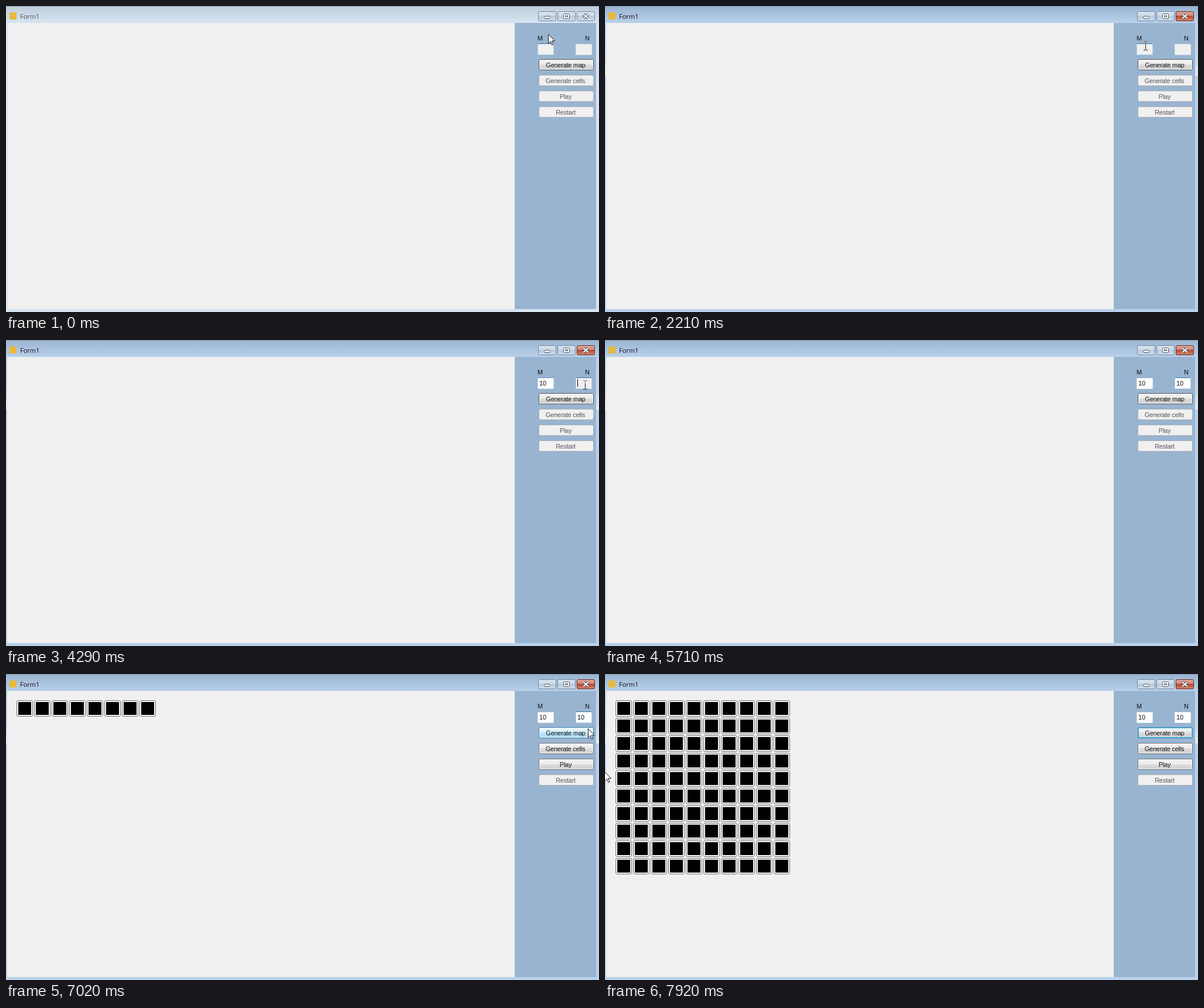
An HTML page that plays this animation: 1013 px wide and 524 px high, repeating every 8000 ms.

```html
<!DOCTYPE html>
<html lang="en">
<head>
<meta charset="utf-8">
<title>Form1</title>
<style>
  html, body { margin: 0; width: 100%; height: 100%; overflow: hidden; background: #d7e4f2; }
  svg { display: block; width: 1013px; height: 524px; }
  text { font: 11px "Liberation Sans", Arial, sans-serif; fill: #111; }
  .label { letter-spacing: -.25px; text-anchor: middle; }
  .off { fill: #555560; }
  .title { font: 11px "Open Sans", "Noto Sans", sans-serif; }

  /* One shared 8 s clock; every state holds until the next one. */
  .anim { animation: 8s step-end infinite; }
  .active { animation-name: activate; }
  .title { animation-name: titleInk; }
  .arrow { animation-name: arrow; }
  .beam { animation-name: beam; }
  .caret { animation-name: caret; }
  .one { animation-name: one; }
  .m-ten { animation-name: mTen; }
  .m-white { animation-name: mWhite; }
  .n-ten { animation-name: nTen; }
  .m-focus { animation-name: mFocus; }
  .n-focus { animation-name: nFocus; }
  .hover { animation-name: hover; }
  .glow { animation-name: glow; }
  .enabled { animation-name: enabled; }
  .first { animation-name: first; }
  .most { animation-name: most; }
  .rest { animation-name: rest; }

  @keyframes activate { 0% { opacity: 0 } 4.85% { opacity: .4 } 6.35% { opacity: .8 } 7.85%, 100% { opacity: 1 } }
  @keyframes titleInk { 0% { fill: #50505c } 4.85%, 100% { fill: #1a0822 } }
  @keyframes one { 0% { opacity: 0 } 29.35% { opacity: 1 } 30.85%, 100% { opacity: 0 } }
  @keyframes mTen { 0% { opacity: 0 } 30.85%, 100% { opacity: 1 } }
  @keyframes mWhite { 0% { opacity: 0 } 29.35%, 100% { opacity: 1 } }
  @keyframes nTen { 0% { opacity: 0 } 64.2%, 100% { opacity: 1 } }
  @keyframes mFocus { 0% { opacity: 1 } 53.6% { opacity: .5 } 55.35%, 100% { opacity: 0 } }
  @keyframes nFocus { 0% { opacity: 0 } 50.45% { opacity: .4 } 51.95% { opacity: 1 } 91.6%, 100% { opacity: 0 } }
  @keyframes hover { 0% { opacity: 0 } 79.45% { opacity: .6 } 80.95% { opacity: 1 } 93.35%, 100% { opacity: 0 } }
  @keyframes glow { 0% { opacity: 0 } 93.35%, 100% { opacity: 1 } }
  @keyframes enabled { 0% { opacity: 0 } 85.85%, 100% { opacity: 1 } }
  @keyframes first { 0% { opacity: 0 } 87.7%, 100% { opacity: 1 } }
  @keyframes most { 0% { opacity: 0 } 89.6%, 100% { opacity: 1 } }
  @keyframes rest { 0% { opacity: 0 } 91.6%, 100% { opacity: 1 } }

  /* Hidden pointers and carets wait outside the stage. */
  @keyframes caret {
    0%, 13.1%, 27.6%, 37.85%, 50.45%, 58.95%, 71.35%, 84.35%, 100% { transform: translate(-50px, 67px) }
    4.85%, 20.1% { transform: translate(911px, 67px) }
    29.35% { transform: translate(917px, 67px) }
    30.85%, 43.6% { transform: translate(923px, 67px) }
    51.95% { transform: translate(976px, 67px) }
    64.2%, 77.95% { transform: translate(988px, 67px) }
  }
  @keyframes beam {
    0%, 29.35%, 43.6%, 64.2%, 100% { transform: translate(-50px, 60px) }
    2.95% { transform: translate(920px, 58px) }
    4.85% { transform: translate(920px, 60px) }
    41.7% { transform: translate(922px, 60px) }
    48.45% { transform: translate(986px, 69px) }
  }
  @keyframes arrow {
    0% { transform: translate(926px, 48px) }
    1.45% { transform: translate(923px, 55px) }
    2.95%, 48.45%, 76.1%, 95.35% { transform: translate(-50px, 0) }
    43.6% { transform: translate(1001px, 10px) }
    45.2% { transform: translate(1001px, 62px) }
    46.95% { transform: translate(990px, 73px) }
    74.6% { transform: translate(981px, 45px) }
    77.95% { transform: translate(1001px, 80px) }
    79.45% { transform: translate(994px, 93px) }
    91.6% { transform: translate(880px, 112px) }
    93.35% { transform: translate(416px, 123px) }
    98.95%, 100% { transform: translate(-1px, 167px) }
  }
</style>
</head>
<body>
<svg viewBox="0 0 1013 524">
  <defs>
    <linearGradient id="idle" x2="0" y2="1"><stop stop-color="#bfcddb"/><stop offset="1" stop-color="#d7e4f2"/></linearGradient>
    <linearGradient id="lit" x2="0" y2="1"><stop stop-color="#99b4d1"/><stop offset="1" stop-color="#b9d1ea"/></linearGradient>
    <linearGradient id="shine" x2="0" y2="1"><stop stop-color="#b9d1ea"/><stop offset=".65" stop-color="#c3d8ee"/><stop offset="1" stop-color="#e2edf8"/></linearGradient>
    <linearGradient id="glass" x2="0" y2="1"><stop stop-color="#d9e4ef"/><stop offset=".5" stop-color="#cbd9e7"/><stop offset=".5" stop-color="#b9cadc"/><stop offset="1" stop-color="#cfdeed"/></linearGradient>
    <linearGradient id="red" x2="0" y2="1"><stop stop-color="#e3aa9e"/><stop offset=".5" stop-color="#d0806f"/><stop offset=".5" stop-color="#b7452f"/><stop offset="1" stop-color="#d68a6c"/></linearGradient>
    <linearGradient id="gray" x2="0" y2="1"><stop stop-color="#f3f3f3"/><stop offset=".5" stop-color="#ebebeb"/><stop offset=".5" stop-color="#dddddd"/><stop offset="1" stop-color="#cfcfcf"/></linearGradient>
    <linearGradient id="blue" x2="0" y2="1"><stop stop-color="#eaf6fd"/><stop offset=".5" stop-color="#d9f0fc"/><stop offset=".5" stop-color="#bee6fd"/><stop offset="1" stop-color="#a7d9f5"/></linearGradient>
    <rect id="face" x="910.5" width="93" height="18" rx="2.5"/>
    <rect id="rim" x="911.5" width="91" height="16" rx="1.5" fill="none"/>
    <rect id="sys" y="9.5" width="30" height="16" rx="2"/>
    <path id="cross" d="M986.5 14l8 7M994.5 14l-8 7"/>
    <g id="cell">
      <rect x=".5" y=".5" width="27" height="27" rx="2.5" fill="#f6f6f6" stroke="#707070"/>
      <rect x="3" y="3" width="22" height="22"/>
    </g>
  </defs>

  <!-- window frame -->
  <rect width="1013" height="524" fill="#d7e4f2"/>
  <rect width="1013" height="29" fill="url(#idle)"/>
  <g class="anim active">
    <rect width="1013" height="524" fill="#b9d1ea"/>
    <rect y="29" width="1013" height="90" fill="url(#shine)"/>
    <rect width="1013" height="29" fill="url(#lit)"/>
  </g>
  <rect width="1013" height="1" fill="#8697aa"/>
  <rect x="6" y="11" width="12" height="12" fill="#e8b93c"/>
  <text class="anim title" x="24" y="22">Form1</text>

  <g fill="url(#glass)" stroke="#73869c">
    <use href="#sys" x="909.5"/>
    <use href="#sys" x="942.5"/>
    <use href="#sys" x="975.5"/>
  </g>
  <g class="anim active" fill="url(#red)" stroke="#6b2a24"><use href="#sys" x="975.5"/></g>
  <g fill="#fff" stroke="#4c5866">
    <rect x="919.5" y="17.5" width="10" height="4" rx="1"/>
    <rect x="952.5" y="13.5" width="10" height="8" rx="1"/>
    <rect x="955.5" y="16.5" width="4" height="2"/>
    <use href="#cross" stroke-width="4.4"/>
    <use href="#cross" stroke="#fff" stroke-width="2.2"/>
  </g>

  <!-- client area -->
  <rect x="2" y="29" width="867" height="490" fill="#f0f0f0"/>
  <rect x="869" y="29" width="139" height="490" fill="#99b4d1"/>
  <g id="board"><g class="anim first"/><g class="anim most"/><g class="anim rest"/></g>

  <!-- inputs -->
  <text x="908" y="59">M</text>
  <text x="989" y="59">N</text>
  <g fill="#f0f0f0" stroke="#e2e6ea">
    <rect x="908.5" y="65.5" width="27" height="18" rx="1"/>
    <rect x="973.5" y="65.5" width="27" height="18" rx="1"/>
  </g>
  <rect class="anim m-white" x="909" y="66" width="26" height="17" fill="#fff"/>
  <rect class="anim n-ten" x="974" y="66" width="26" height="17" fill="#fff"/>
  <g fill="none" stroke="#b5cfe7">
    <g class="anim m-focus"><rect x="908.5" y="64.5" width="27" height="19" rx="1"/><path d="M909 64.5h26" stroke="#3d7bad"/></g>
    <g class="anim n-focus"><rect x="973.5" y="64.5" width="27" height="19" rx="1"/><path d="M974 64.5h26" stroke="#3d7bad"/></g>
  </g>
  <text class="anim one" x="911" y="78">1</text>
  <text class="anim m-ten" x="911" y="78">10</text>
  <text class="anim n-ten" x="976" y="78">10</text>

  <!-- buttons -->
  <use href="#face" y="91.5" fill="url(#gray)" stroke="#55585c"/>
  <use href="#rim" y="92.5" stroke="#fafafa"/>
  <g class="anim hover">
    <use href="#face" y="91.5" fill="url(#blue)" stroke="#3c7fb1"/>
    <use href="#rim" y="92.5" stroke="#f2fafe"/>
  </g>
  <g class="anim glow">
    <use href="#face" y="91.5" fill="url(#gray)" stroke="#3c7fb1"/>
    <use href="#rim" y="92.5" stroke="#46cdf2"/>
  </g>
  <text class="label" x="956" y="105">Generate map</text>

  <g fill="#f0f0f0" stroke="#adb2b5">
    <use href="#face" y="118.5"/>
    <use href="#face" y="145.5"/>
    <use href="#face" y="172.5"/>
  </g>
  <text class="label off" x="955.5" y="132">Generate cells</text>
  <text class="label off" x="956" y="159">Play</text>
  <text class="label off" x="956" y="186">Restart</text>
  <g class="anim enabled">
    <g fill="url(#gray)" stroke="#707070">
      <use href="#face" y="118.5"/>
      <use href="#face" y="145.5"/>
    </g>
    <use href="#rim" y="119.5" stroke="#fafafa"/>
    <use href="#rim" y="146.5" stroke="#fafafa"/>
    <text class="label" x="955.5" y="132">Generate cells</text>
    <text class="label" x="956" y="159">Play</text>
  </g>

  <!-- caret and pointers -->
  <rect class="anim caret" width="1" height="13"/>
  <g class="anim beam" fill="none">
    <path d="M0 .5h3M4 .5h3M3.5 1v5" stroke="#8a5a42"/>
    <path d="M3.5 6v9M0 15.5h3M4 15.5h3" stroke="#1c1c1c"/>
  </g>
  <path class="anim arrow" d="M.5 .5v15.6l3.6-3.5 2.6 6 2.3-1-2.6-5.8h5z" fill="#fff" stroke="#16161c"/>
</svg>
<script>
  // Fill a 10 by 10 board in reading order, split by when each part appears.
  const [first, most, rest] = document.getElementById('board').children;
  for (let i = 0; i < 100; i++) {
    const cell = document.createElementNS('http://www.w3.org/2000/svg', 'use');
    cell.setAttribute('href', '#cell');
    cell.setAttribute('x', 18 + 30 * (i % 10));
    cell.setAttribute('y', 45 + 30 * Math.floor(i / 10));
    (i < 8 ? first : i < 85 ? most : rest).append(cell);
  }
</script>
</body>
</html>
```
